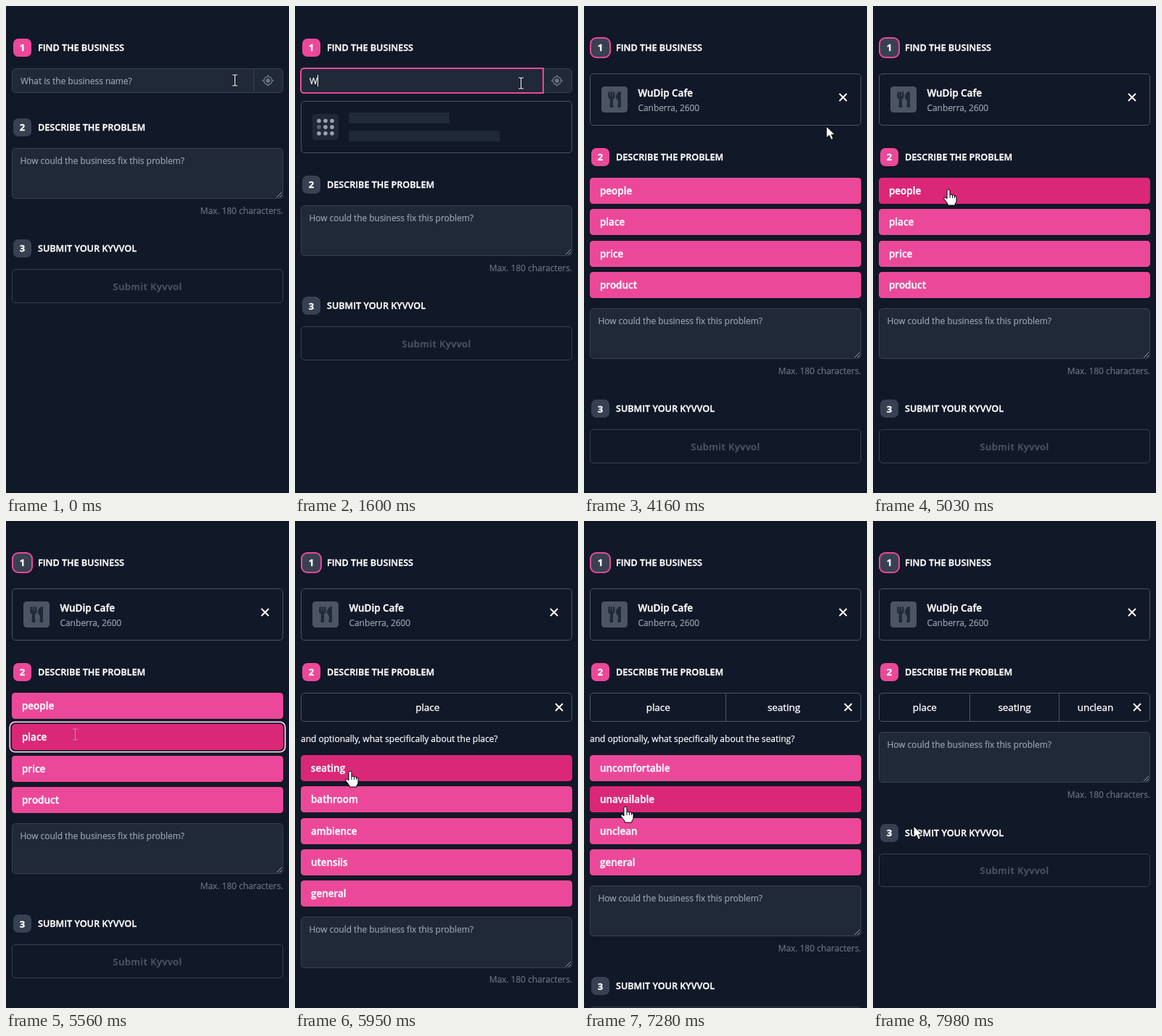
An HTML page with a canvas for the animation above (8 s loop, 390 px wide and 672 px high).

```html
<!DOCTYPE html>
<html lang="en">
<head>
<meta charset="utf-8">
<title>Feedback form</title>
<style>
html, body { margin: 0; width: 100%; height: 100%; overflow: hidden; background: #111827; }
canvas { display: block; }
</style>
</head>
<body>
<canvas id="stage" width="390" height="672"></canvas>
<script>
const ctx = document.getElementById('stage').getContext('2d');
const LOOP = 8000;
const FONT = '"Open Sans", "Noto Sans", sans-serif';
const C = {
  bg: '#111827', field: '#1f2937', line: '#374151', edge: '#4b5563', dim: '#6b7280',
  soft: '#9ca3af', white: '#ffffff', pink: '#ec4899', hot: '#db2777', ring: '#fbcfe8'
};
const BODY = 11.9, TITLE = 13.45, HEAD = 12.6;
const PITCH = 43.25, RESULT = 79.25;
const BRAND = 'Kyvvol', SEARCH = 'WuDip', PLACE = SEARCH + ' Cafe';

// When the form moves from one state to the next
const AT = { focus: 510, search: 1600, results: 2790, press: 4020, selected: 4160 };
const KEY_TIMES = [1600, 1750, 1980, 2130, 2290];
const LEVELS = [
  { from: 4160, click: 5490, pick: 1, top: 237, rows: ['people', 'place', 'price', 'product'] },
  { from: 5640, click: 6580, pick: 0, top: 323, rows: ['seating', 'bathroom', 'ambience', 'utensils', 'general'] },
  { from: 6720, click: 7740, pick: 2, top: 323, rows: ['uncomfortable', 'unavailable', 'unclean', 'general'] },
  { from: 7900, click: LOOP, pick: -1, top: 284.1, rows: [] }
];
const POINTER = [
  [0, 315, 102], [700, 315, 102], [760, 313, 101], [900, 313, 103], [1070, 311, 106],
  [3060, 311, 106], [3200, 318, 115], [3420, 325, 137], [3870, 334, 166], [4280, 334, 166],
  [4480, 270, 205], [4860, 105, 248], [5000, 105, 250], [5400, 95, 294], [5720, 95, 294],
  [5900, 80, 335], [6150, 62, 384], [6380, 59, 351], [6830, 59, 351], [7100, 58, 370],
  [7480, 56, 421], [LOOP, 56, 421]
];

const CUTLERY = new Path2D('M208 15c1 5 16 95 16 129 0 52-28 90-69 105L168 487c1 14-10 25-24 25H80c-14 0-25-11-24-25L69 249C28 234 0 196 0 144 0 110 15 20 16 15 19-5 61-5 64 16v141c1 4 15 3 16 0 1-25 8-139 8-141 3-21 45-21 48 0 0 2 7 116 8 141 1 3 15 4 16 0V16c3-21 45-21 48-1zm119 286l-15 185c-1 14 10 26 24 26h56c13 0 24-11 24-24V24c0-13-11-24-24-24-82 0-221 179-65 301z');
const ARROW = new Path2D('M0 0V16L4 12.5L6.5 18.5L9.5 17L7 11.5H12Z');
const HAND = new Path2D('M-2 1.5Q0-1.5 2 1.5V8Q4 6 5.5 8Q7.5 7 8.5 9Q11 8.5 11 11V16Q11 18 9 20V22H-1V20L-6 13.5Q-7 11-4.5 11L-2 13Z');
const IBEAM = new Path2D('M-3.5-7.5H-1L0-6.8L1-7.5H3.5M0-6.8V6.8M-3.5 7.5H-1L0 6.8L1 7.5H3.5');

function box(x, y, w, h, r, fill, stroke, width = 1) {
  ctx.beginPath();
  ctx.roundRect(x, y, w, h, r);
  if (fill) { ctx.fillStyle = fill; ctx.fill(); }
  if (stroke) { ctx.strokeStyle = stroke; ctx.lineWidth = width; ctx.stroke(); }
}

// Hairline box whose edges snap to whole pixels
function frame(x, y, w, h, fill, stroke) {
  const top = Math.round(y), bottom = Math.round(y + h);
  box(x + .5, top + .5, w - 1, bottom - top - 1, 4.5, fill, stroke);
}

function focusRing(x, y, w, h, r) {
  box(x - 1, y - 1, w + 2, h + 2, r + 1, null, C.bg, 2);
  box(x - 2.7, y - 2.7, w + 5.4, h + 5.4, r + 2.7, null, C.ring, 1.8);
}

// y is the middle of the capitals; a thin outline gives the letters more body
function text(str, x, y, size, color, weight = 400, align = 'left', spacing = 0) {
  const base = Math.round(y + size * .36);
  ctx.font = `${weight} ${size}px ${FONT}`;
  ctx.letterSpacing = spacing + 'px';
  ctx.textAlign = align;
  ctx.fillStyle = ctx.strokeStyle = color;
  ctx.lineWidth = weight > 400 ? .35 : .2;
  ctx.fillText(str, x, base);
  ctx.strokeText(str, x, base);
}

function stroke(points, color, width) {
  ctx.beginPath();
  points.forEach(([x, y], i) => i ? ctx.lineTo(x, y) : ctx.moveTo(x, y));
  ctx.strokeStyle = color;
  ctx.lineWidth = width;
  ctx.stroke();
}

function dot(x, y, r, color) {
  ctx.beginPath();
  ctx.arc(x, y, r, 0, Math.PI * 2);
  ctx.fillStyle = color;
  ctx.fill();
}

function cross(x, y) {
  stroke([[x - 5, y - 5], [x + 5, y + 5]], C.white, 1.9);
  stroke([[x + 5, y - 5], [x - 5, y + 5]], C.white, 1.9);
}

function heading(n, label, y, state) {
  const top = Math.round(y - 12.5);
  if (state === 'done') box(8, top - 2, 29, 29, 9, C.pink);
  box(10, top, 25, 25, 7, state === 'active' ? C.pink : C.line);
  text(n, 22.5, y, 13, C.white, 700, 'center');
  text(label, 44, y, HEAD, C.white, 600);
}

function searchField(t) {
  const focused = t >= AT.focus && t < AT.press;
  frame(8, 86, 374, 34, C.field, C.line);
  stroke([[341.5, 86], [341.5, 120]], C.line, 1);
  ctx.strokeStyle = C.dim;
  ctx.lineWidth = 1.5;
  ctx.beginPath();
  ctx.arc(361, 103, 5.6, 0, Math.PI * 2);
  ctx.stroke();
  dot(361, 103, 3, C.dim);
  for (const [dx, dy] of [[1, 0], [-1, 0], [0, 1], [0, -1]])
    stroke([[361 + dx * 5.6, 103 + dy * 5.6], [361 + dx * 8, 103 + dy * 8]], C.dim, 1.5);
  if (focused) box(8, 86, 334, 34, [4.5, 0, 0, 4.5], null, C.pink, 2);

  const typed = SEARCH.slice(0, KEY_TIMES.filter(k => t >= k).length);
  text(typed || 'What is the business name?', 20, 103.5, BODY, typed ? C.white : C.soft);
  if (!focused) return;
  const width = typed ? ctx.measureText(typed).width : 0;
  if (typed.length > 1) {
    const wave = [];
    for (let x = 0; x <= width; x += 1.5) wave.push([20 + x, 110 + (x / 1.5 % 2 ? .8 : -.8)]);
    stroke(wave, '#e5352d', 1);
  }
  const lastKey = Math.max(AT.focus, ...KEY_TIMES.filter(k => t >= k));
  if ((t - lastKey) % 1060 < 530) {
    ctx.fillStyle = C.white;
    ctx.fillRect(Math.round(20 + width), 95, 1, 16);
  }
}

function skeleton(t) {
  frame(8, 131, 374, 72, null, C.edge);
  box(24, 149, 36, 36, 4.5, C.field);
  box(74, 147, 139, 15, 0, C.field);
  box(74, 172, 208, 15, 0, C.field);
  // column by column, the order in which the dots dim
  const order = [0, 1, 7, 3, 6, 5, 8, 4, 2];
  order.forEach((slot, i) => {
    const phase = ((t - AT.search) / 100 + 1 - slot + 10) % 10;
    const gap = Math.min(phase, 10 - phase);
    ctx.globalAlpha = 1 - .55 * Math.max(0, 1 - gap);
    dot(33 + Math.floor(i / 3) * 9, 158.5 + i % 3 * 8.6, 2.8, C.soft);
  });
  ctx.globalAlpha = 1;
}

function card(y, title, detail, plus) {
  frame(8, y, 374, 72, null, C.edge);
  box(24, y + 18, 36, 36, 4.5, C.edge);
  if (plus) {
    stroke([[34, y + 36], [50, y + 36]], C.bg, 2);
    stroke([[42, y + 28], [42, y + 44]], C.bg, 2);
  } else {
    const scale = 22 / 512;
    ctx.save();
    ctx.translate(42, y + 36);
    ctx.scale(scale, scale);
    ctx.translate(-208, -256);
    ctx.fillStyle = C.field;
    ctx.fill(CUTLERY);
    ctx.restore();
  }
  text(title, 74.5, y + 27, TITLE, C.white, 600);
  text(detail, 74.5, y + 47.5, BODY, C.soft);
}

function pill(label, x, y, hover, ring) {
  const w = 366 - x;
  box(x, y - 11, w, 22, 11, hover ? C.hot : C.pink);
  if (ring) focusRing(x, y - 11, w, 22, 11);
  text(label, x + w / 2, y, 12.1, C.white, 600, 'center');
}

function tabs(names) {
  frame(8, 237, 374, 40, null, C.edge);
  const w = 371 / names.length;
  names.forEach((name, i) => {
    const left = 9.5 + i * w;
    const right = i === names.length - 1 ? 356 : left + w;
    const edge = Math.floor(left) + .5;
    if (i) stroke([[edge, 238], [edge, 276]], C.edge, 1);
    text(name, (left + right) / 2, 257.5, TITLE, C.white, 500, 'center');
  });
  cross(364, 257);
}

function options(level, t, pointer) {
  level.rows.forEach((label, i) => {
    const y = Math.round(level.top + i * PITCH);
    const chosen = i === level.pick && t >= level.click;
    const hover = pointer.y >= y && pointer.y < y + 36;
    box(8, y, 374, 36, 4.5, chosen || hover ? C.hot : C.pink);
    if (chosen) focusRing(8, y, 374, 36, 4.5);
    text(label, 22, y + 18.5, TITLE, C.white, 600);
  });
}

function lowerForm(y) {
  frame(8, y, 374, 70.2, C.field, C.line);
  const bottom = Math.round(y + 70.2);
  stroke([[373, bottom - 2], [380, bottom - 9]], C.soft, 1);
  stroke([[377, bottom - 2], [380, bottom - 5]], C.soft, 1);
  text('How could the business fix this problem?', 19.5, y + 17.5, BODY, C.soft);
  text('Max. 180 characters.', 382, y + 86.5, BODY, C.dim, 400, 'right');
  heading('3', 'SUBMIT YOUR ' + BRAND.toUpperCase(), y + 138.8, 'idle');
  frame(8, y + 167.3, 374, 46.8, null, C.line);
  text('Submit ' + BRAND, 195, y + 191, 13, C.edge, 600, 'center', .5);
}

function pointerAt(t) {
  const i = POINTER.findIndex(k => k[0] > t);
  const [t0, x0, y0] = POINTER[i - 1], [t1, x1, y1] = POINTER[i];
  const f = (t - t0) / (t1 - t0);
  return { x: x0 + (x1 - x0) * f, y: y0 + (y1 - y0) * f };
}

function drawPointer(p, kind, onPink) {
  ctx.save();
  ctx.translate(Math.round(p.x), Math.round(p.y));
  ctx.lineJoin = 'round';
  if (kind === 'ibeam') {
    ctx.translate(.5, .5);
    ctx.strokeStyle = '#0b0f18';
    ctx.lineWidth = 2.4;
    if (!onPink) ctx.stroke(IBEAM);
    ctx.strokeStyle = onPink ? '#a09aa0' : C.white;
    ctx.lineWidth = 1.1;
    ctx.stroke(IBEAM);
  } else {
    const shape = kind === 'hand' ? HAND : ARROW;
    ctx.fillStyle = C.white;
    ctx.fill(shape);
    ctx.strokeStyle = '#000000';
    ctx.lineWidth = 1;
    ctx.stroke(shape);
    if (kind === 'hand') {
      for (const x of [2, 5.5, 8.5]) stroke([[x, 8], [x, 12]], '#000000', .9);
    }
  }
  ctx.restore();
}

function draw(t) {
  const p = pointerAt(t);
  let kind = 'arrow', onPink = false;
  ctx.fillStyle = C.bg;
  ctx.fillRect(0, 0, 390, 672);

  if (t < AT.selected) {
    heading('1', 'FIND THE BUSINESS', 57.5, 'active');
    searchField(t);
    let shift = 0;
    if (t >= AT.results) {
      const over = p.x >= 314 && p.y >= 156;
      card(131, PLACE, 'Canberra, 2600');
      card(210, "Can't find a place?", 'Help us improve by adding a place', true);
      pill('Select', 314, 167, over, t >= AT.press);
      pill('Add', 324, 246);
      shift = 2 * RESULT;
      if (over) kind = 'hand';
    } else if (t >= AT.search) {
      skeleton(t);
      shift = RESULT;
    }
    heading('2', 'DESCRIBE THE PROBLEM', 167 + shift, 'idle');
    lowerForm(195.9 + shift);
    if (p.y < 120) kind = 'ibeam';
  } else {
    const depth = LEVELS.filter(l => t >= l.from).length - 1;
    const level = LEVELS[depth];
    heading('1', 'FIND THE BUSINESS', 57.5, 'done');
    card(93, PLACE, 'Canberra, 2600');
    cross(357, 126);
    heading('2', 'DESCRIBE THE PROBLEM', 208.5, 'active');
    const path = LEVELS.slice(0, depth).map(l => l.rows[l.pick]);
    if (depth) tabs(path);
    if (depth && level.rows.length)
      text(`and optionally, what specifically about the ${path[depth - 1]}?`, 8, 300.5, 12, C.white);
    options(level, t, p);
    lowerForm(level.top + level.rows.length * PITCH + 7.1);

    const offset = p.y - level.top;
    if (level.rows.length && offset >= 0 && offset % PITCH < 36) kind = 'hand';
    if (depth === 1 && p.y > 288 && p.y < 312) kind = 'ibeam';
    if (depth === 0 && t >= 5555) { kind = 'ibeam'; onPink = true; }
  }
  drawPointer(p, kind, onPink);
}

function tick() {
  draw(performance.now() % LOOP);
  requestAnimationFrame(tick);
}
tick();
</script>
</body>
</html>
```
